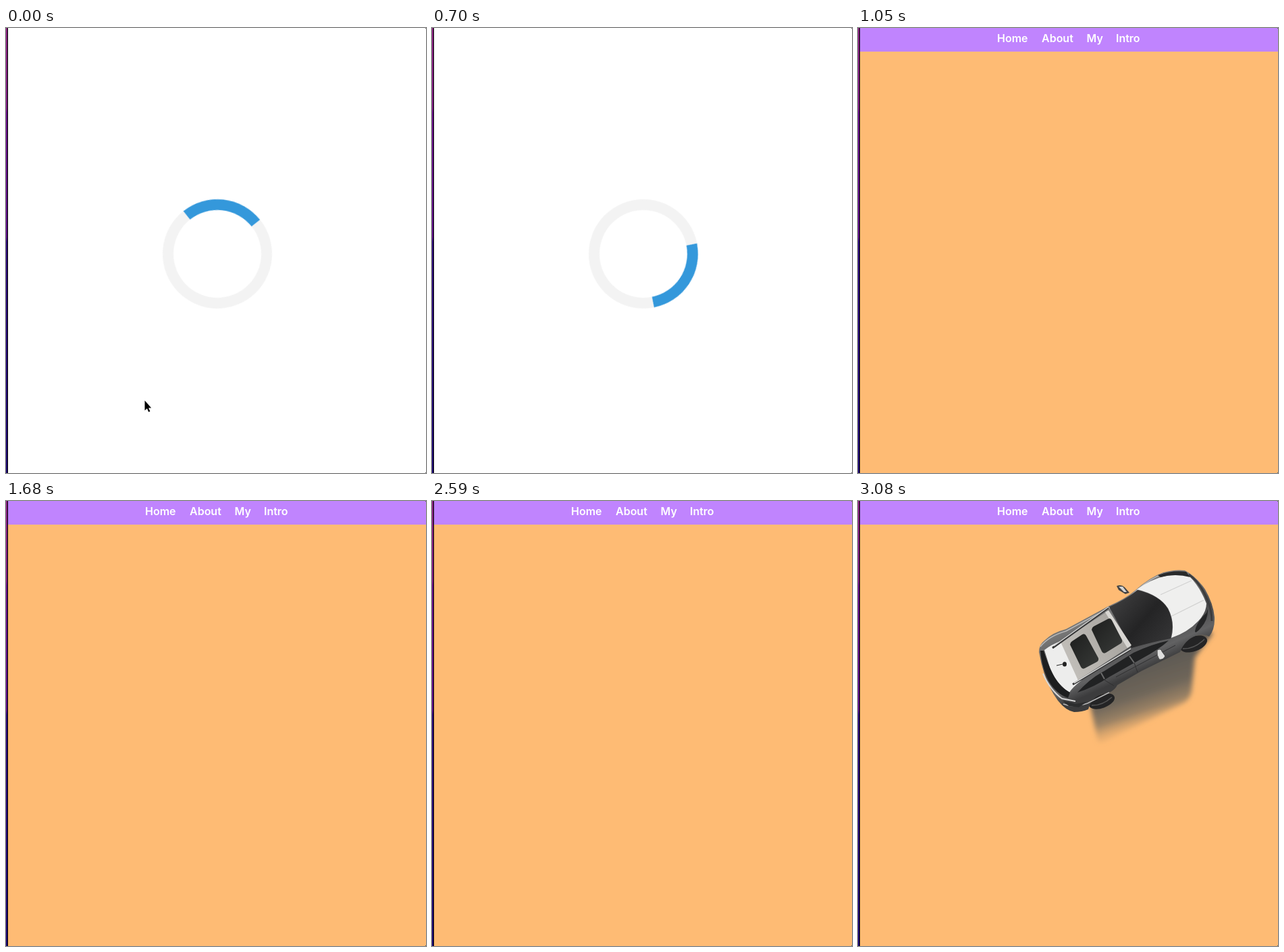
An HTML page that plays this animation: 622x660 px, repeating every 3150 ms.

```html
<!DOCTYPE html>
<html lang="en">
<head>
<meta charset="utf-8">
<title>Page loader</title>
<style>
  html, body { margin: 0; width: 100%; height: 100%; overflow: hidden; background: #fff; }
  body { position: relative; }
  svg { position: absolute; left: 0; top: 0; }

  .loader, .spin, .page, .car, .cursor {
    animation: 3150ms step-end infinite;
  }
  .loader {
    position: absolute; left: 313px; top: 335px;
    width: 0; height: 0;
  }
  .spin {
    position: absolute; box-sizing: border-box;
    width: 162px; height: 162px; left: -81px; top: -81px;
    border: 16px solid #f3f3f3; border-top-color: #3498db; border-radius: 50%;
    animation-name: size;
  }
  .loader { animation-name: turn; }
  .page { animation-name: page; }
  .car { animation-name: car; }
  .cursor { animation-name: cursor; }

  @keyframes turn {
    0% { transform: rotate(6.4deg); animation-timing-function: steps(15, end); }
    33.3333%, 100% { transform: rotate(182.5deg); }
  }
  /* the box model changes once the page styles arrive */
  @keyframes size {
    0% { width: 162px; height: 162px; left: -81px; top: -81px; }
    28.8888%, 100% { width: 130px; height: 130px; left: -65px; top: -65px; }
  }
  @keyframes page {
    0% { visibility: hidden; }
    33.3333%, 100% { visibility: visible; }
  }
  @keyframes car {
    0% { visibility: hidden; }
    84.4444%, 100% { visibility: visible; }
  }
  @keyframes cursor {
    0% { transform: translate(0, 0); }
    2.2222% { transform: translate(1px, 14px); }
    4.4444% { transform: translate(3px, 44px); }
    6.6666% { transform: translate(6px, 82px); }
    8.8888%, 100% { transform: translate(8px, 120px); }
  }
  .nav { font: 600 16px Inter, Roboto, sans-serif; fill: #fff; }
</style>
</head>
<body>
<div class="loader"><div class="spin"></div></div>

<svg width="622" height="660" viewBox="0 0 622 660">
  <defs>
    <linearGradient id="edge" x1="0" y1="0" x2="0" y2="1">
      <stop offset="0" stop-color="#86207c"/>
      <stop offset=".18" stop-color="#7c1a80"/>
      <stop offset=".19" stop-color="#660f86"/>
      <stop offset=".47" stop-color="#5a0c84"/>
      <stop offset=".48" stop-color="#2c0a78"/>
      <stop offset="1" stop-color="#1c0870"/>
    </linearGradient>
    <linearGradient id="shade" gradientUnits="userSpaceOnUse" x1="410" y1="250" x2="436" y2="328">
      <stop offset="0" stop-color="#5f5a53"/>
      <stop offset=".45" stop-color="#6f665a"/>
      <stop offset=".75" stop-color="#8f7b62" stop-opacity=".9"/>
      <stop offset="1" stop-color="#c99a67" stop-opacity=".35"/>
    </linearGradient>
    <linearGradient id="body" gradientUnits="userSpaceOnUse" x1="385" y1="160" x2="425" y2="250">
      <stop offset="0" stop-color="#767676"/>
      <stop offset=".5" stop-color="#4a4a4b"/>
      <stop offset=".8" stop-color="#626263"/>
      <stop offset="1" stop-color="#3c3c3d"/>
    </linearGradient>
    <linearGradient id="glass" gradientUnits="userSpaceOnUse" x1="385" y1="150" x2="455" y2="210">
      <stop offset="0" stop-color="#3a3a3b"/>
      <stop offset=".5" stop-color="#242425"/>
      <stop offset="1" stop-color="#343435"/>
    </linearGradient>
    <linearGradient id="roof" gradientUnits="userSpaceOnUse" x1="300" y1="235" x2="385" y2="190">
      <stop offset="0" stop-color="#c3c0bb"/>
      <stop offset="1" stop-color="#a9a6a1"/>
    </linearGradient>
    <linearGradient id="panel" x1="0" y1="0" x2="1" y2="1">
      <stop offset="0" stop-color="#1d1e1d"/>
      <stop offset="1" stop-color="#383a38"/>
    </linearGradient>
    <filter id="soft" x="-20%" y="-20%" width="140%" height="140%">
      <feGaussianBlur stdDeviation="3.5"/>
    </filter>
  </defs>

  <g class="cursor">
    <path d="M205.5 552.5V567.3L208.9 564.2L211.2 569.6L213.4 568.6L211.1 563.4H215.2Z"
      stroke="#fff" stroke-width="1.6" paint-order="stroke"/>
  </g>

  <g class="page">
    <path fill="#febb74" d="M3 35H622V660H3Z"/>
    <path fill="#c084fe" d="M3 0H622V35H3Z"/>
    <g class="nav">
      <text x="206" y="21">Home</text>
      <text x="272" y="21">About</text>
      <text x="338.5" y="21">My</text>
      <text x="382" y="21">Intro</text>
    </g>
  </g>

  <g class="car">
    <path d="M344 302L355 356Q358 360 368 355L482 300Q492 294 494 282L499 232L526 196L510 190L400 240Z"
      fill="url(#shade)" filter="url(#soft)"/>
    <!-- wheels -->
    <g fill="#242425">
      <ellipse cx="361" cy="297" rx="20" ry="10" transform="rotate(-20 361 297)"/>
      <ellipse cx="497" cy="212" rx="21" ry="11" transform="rotate(-20 497 212)"/>
    </g>
    <g fill="none" stroke="#555" stroke-width="1.5">
      <path d="M346 303Q361 304 376 291M481 219Q498 220 513 205"/>
    </g>
    <!-- shell -->
    <path fill="url(#body)" d="M268 224Q268 213 276 207Q288 195 308 190L371 156Q396 145 410 133
      Q432 113 452 106Q470 101 484 103Q500 111 514 131Q526 152 528 172Q529 190 520 201
      Q512 196 500 200Q484 206 477 224L420 252L384 273Q378 285 362 286Q346 291 341 309
      Q332 313 320 313Q308 311 296 296Q276 269 268 224Z"/>
    <path fill="none" stroke="#b9b9b9" stroke-width="1.5"
      d="M270 216Q283 200 308 193L371 159Q398 147 412 133Q432 115 452 108M304 301Q318 307 340 300L372 284"/>
    <!-- hood -->
    <path fill="#efefee" d="M413 131Q434 116 456 111Q478 107 491 112Q507 128 516 152Q516 165 504 178
      Q488 195 464 203Q470 180 459 159Q446 139 413 131Z"/>
    <path fill="none" stroke="#d2d2d1" stroke-width="1.3" d="M448 139L494 118M464 171L512 147"/>
    <path fill="#292a2b" d="M444 110Q466 102 486 105L492 113Q470 107 448 113Z"/>
    <path fill="#252627" d="M518 160Q519 176 507 189Q499 198 499 193Q501 180 516 166Z"/>
    <path fill="none" stroke="#3b3b3c" stroke-width="3" d="M490 109Q508 122 518 148Q524 163 524 178"/>
    <!-- windows -->
    <path fill="url(#glass)" d="M372 157Q395 147 414 132Q447 140 459 160Q469 180 463 204Q436 209 405 218Z"/>
    <path fill="#212223" d="M325 284Q345 262 365 252L408 225Q436 212 460 207Q446 220 420 234L372 261Q350 276 325 284Z"/>
    <path stroke="#6a6a6a" stroke-width="2" d="M360 255L365 264M402 230L409 240"/>
    <path fill="none" stroke="#303031" d="M364 265L379 274M409 240L414 254M382 261L470 214"/>
    <!-- roof -->
    <path fill="#ededec" d="M276 221Q286 213 302 207L331 266Q318 276 313 284Q294 271 285 250Z"/>
    <path fill="url(#roof)" d="M300 209L370 163L404 215L326 266Z"/>
    <path fill="#d8d6d2" d="M366 165L371 162L405 214L399 218Z"/>
    <g fill="url(#panel)">
      <path d="M317 208L332 198Q336 196 338 200L356 233Q357 237 353 239L336 248Q332 250 330 246L314 213Q314 210 317 208Z"/>
      <path d="M349 186L370 175Q374 173 376 177L391 206Q392 210 388 212L367 225Q363 227 361 223L346 191Q346 188 349 186Z"/>
    </g>
    <path fill="none" stroke="#353536" stroke-width="3" d="M288 218L371 158M318 272L404 220"/>
    <path fill="none" stroke="#d7d7d6" stroke-width="1.5" d="M290 215L371 157M320 270L404 219"/>
    <path fill="#1d1e1f" d="M270 222L275 222Q282 245 291 261Q300 277 314 284L311 292Q293 286 282 266Q272 246 270 222Z"/>
    <path fill="none" stroke="#d6d6d6" stroke-width="2" d="M274 256Q285 281 302 293L322 297"/>
    <path fill="#2c2d2e" d="M303 296L322 301L339 298L327 306L312 304Z"/>
    <path fill="none" stroke="#222" stroke-width="1" d="M294 244L303 242"/>
    <ellipse cx="306" cy="242" rx="3" ry="3.5" fill="#222"/>
    <!-- mirrors -->
    <path fill="#444" d="M383 126Q390 123 395 128L402 136L396 138L386 132Z"/>
    <path fill="#d4d4d3" d="M386 127L392 127L398 135L394 135Z"/>
    <path fill="#dededd" stroke="#444" stroke-width="1" d="M443 221Q449 218 450 223L455 230Q452 236 446 235Q442 229 443 221Z"/>
  </g>

  <path fill="url(#edge)" d="M0 0H2V660H0Z"/>
  <path d="M2 0H3V660H2Z"/>
  <path fill="#555" d="M621 0H622V1H621ZM621 659H622V660H621Z"/>
</svg>
</body>
</html>
```
